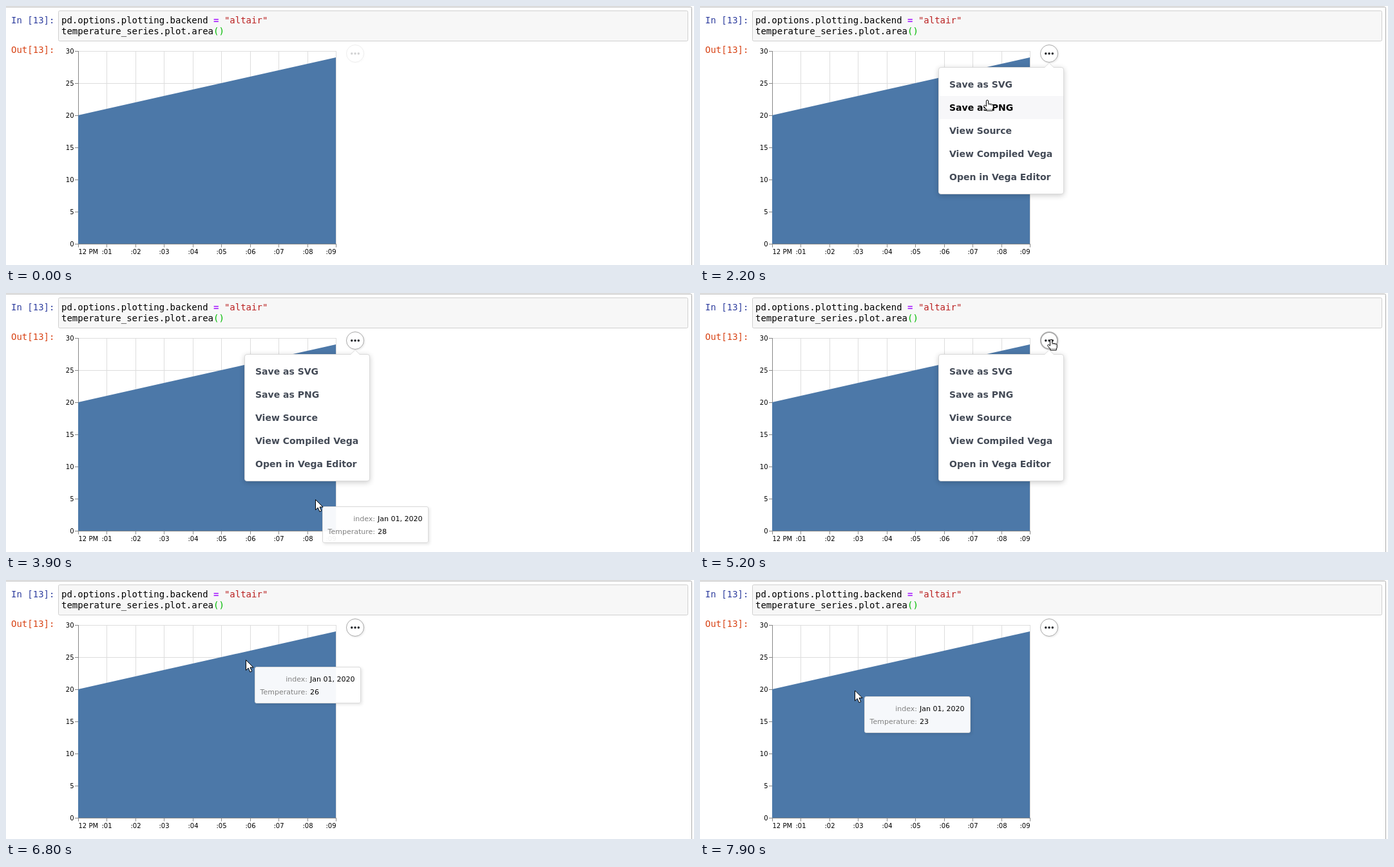
Animation, 1068 px wide and 403 px high, one loop 8 s. Source, as an HTML page:

```html
<!DOCTYPE html>
<html lang="en">
<head>
<meta charset="utf-8">
<title>Area plot in a notebook</title>
<style>
html, body { margin: 0; width: 100%; height: 100%; overflow: hidden; background: #fff; font-family: "DejaVu Sans", sans-serif; }
body > * { position: absolute; box-sizing: border-box; }
#page, #pointer { left: 0; top: 0; }
.code { font: 14px "DejaVu Sans Mono", monospace; white-space: pre; }
#chart text { font-size: 10px; }
#button {
  left: 528px; top: 60px; width: 28px; height: 28px; display: flex; align-items: center; justify-content: center;
  background: #fff; border: 1px solid #aaa; border-radius: 50%; box-shadow: 1px 1px 3px rgba(0, 0, 0, .1);
}
#button svg { flex: none; }
#menu {
  left: 370px; top: 95px; width: 195px; height: 198px; padding: 8px 0; background: #fff;
  border: 1px solid #d9d9d9; border-radius: 4px; box-shadow: 0 2px 8px rgba(0, 0, 0, .2);
}
#menu div { padding: 8px 16px; font-size: 14px; font-weight: 600; line-height: 20px; white-space: nowrap; color: #434a56; }
#menu div.hover { background: #f7f7f9; color: #000; }
#menu::before, #menu::after { content: ""; position: absolute; border: 8px solid transparent; border-bottom-color: #d9d9d9; right: 14px; top: -16px; }
#menu::after { border-width: 7px; border-bottom-color: #fff; right: 15px; top: -14px; }
#tip {
  left: 0; top: 0; width: 165px; height: 57px; background: rgba(255, 255, 255, .95);
  border: 1px solid #d9d9d9; border-radius: 3px; box-shadow: 2px 2px 4px rgba(0, 0, 0, .1);
}
#tip svg { position: absolute; left: -1px; top: -1px; font-size: 11px; }
#pointer g { fill: #fff; stroke: #000; stroke-linejoin: round; }
</style>
</head>
<body>
<svg id="page" width="1068" height="403">
  <path d="M0 1.5H1062.5q2 0 2 2V403" fill="none" stroke="#ababab"/>
  <rect x="81.5" y="7.5" width="977" height="47" rx="2" fill="#f7f7f7" stroke="#cfcfcf"/>
  <g class="code">
    <text x="8" y="27" fill="#303f9f">In [13]:</text>
    <text x="8" y="73" fill="#d84315">Out[13]:</text>
    <text x="86" y="27">pd.options.plotting.backend <tspan fill="#a2f" font-weight="bold">=</tspan> <tspan fill="#ba2121">"altair"</tspan></text>
    <text x="86" y="44">temperature_series.plot.area<tspan fill="#0b0">()</tspan></text>
  </g>
  <g id="chart"></g>
</svg>
<div id="button"><svg width="14" height="14" viewBox="0 0 16 16" fill="#1b1e23"><circle cx="2" cy="8" r="2"/><circle cx="8" cy="8" r="2"/><circle cx="14" cy="8" r="2"/></svg></div>
<div id="menu"><div>Save as SVG</div><div>Save as PNG</div><div>View Source</div><div>View Compiled Vega</div><div>Open in Vega Editor</div></div>
<div id="tip"><svg width="165" height="57">
  <g fill="#808080" text-anchor="end"><text x="82" y="23">index:</text><text x="82" y="43">Temperature:</text></g>
  <text x="86" y="23">Jan 01, 2020</text><text id="value" x="86" y="43"></text>
</svg></div>
<svg id="pointer" width="1068" height="403">
  <g id="arrow"><path d="M-.5-.5V15.5L3.2 12 5.9 18.2 8.7 17 6 11H11z"/></g>
  <g id="hand">
    <path d="M-1.6 10V2a1.6 1.6 0 0 1 3.2 0V6L7.4 7q1.8.4 1.8 2v3q0 2-1 3.4V17H-1.2V15.4L-5 10.6q-1-1.6.2-2.1 1.2-.4 3.2 1.5z"/>
    <path d="M1.8 7v2M4.4 7.5v2M6.9 8v2M-1 14.9H8" stroke-width=".8" stroke-dasharray="1 1"/>
  </g>
  <g id="beam"><path d="M-3-8Q0-8 0-6V6Q0 8-3 8M3-8Q0-8 0-6M0 6Q0 8 3 8" style="fill:none"/></g>
</svg>
<script>
const $ = id => document.getElementById(id);
const LOOP = 8000, STEP = 100, LAG = 30;
const LEFT = 112, TOP = 70, WIDTH = 400, BOTTOM = 370;
const seriesX = i => LEFT + i * WIDTH / 9;
const tempY = v => BOTTOM - v * 10;

function drawChart() {
  let grid = '', axes = '', labels = '';
  for (let v = 0; v <= 30; v += 5) {
    const y = tempY(v) + .5;
    grid += `M${LEFT} ${y}h${WIDTH}`;
    axes += `M${LEFT - 5} ${y}h5`;
    labels += `<text x="105.5" y="${y + 3.5}" text-anchor="end">${v}</text>`;
  }
  for (let i = 0; i < 10; i++) {
    const x = Math.round(seriesX(i)) + .5;
    grid += `M${x} ${TOP}V${BOTTOM}`;
    axes += `M${x} ${BOTTOM}v5.5`;
    const anchor = i === 0 ? 'start' : i === 9 ? 'end' : 'middle';
    labels += `<text x="${x}" y="386" text-anchor="${anchor}">${i ? ':0' + i : '12 PM'}</text>`;
  }
  axes += `M${LEFT + .5} ${TOP}V${BOTTOM + .5}H${LEFT + WIDTH + .5}`;
  $('chart').innerHTML = `<path d="${grid}" stroke="#ddd"/><path d="${axes}" fill="none" stroke="#888"/>
    <path d="M${LEFT} ${BOTTOM}V${tempY(20)}L${LEFT + WIDTH} ${tempY(29)}V${BOTTOM}z" fill="#4c78a8"/>${labels}`;
}

// Pointer path: time, x, y
const path = [
  [700, 424, -4], [1100, 541, 83], [1200, 537.5, 78], [1500, 537.5, 78], [1600, 536, 83],
  [2200, 446, 146], [3100, 462, 268], [3800, 481, 321], [3900, 481, 322], [4000, 481, 322],
  [4300, 494, 296], [4900, 545, 77], [5000, 545, 72], [5500, 545, 72], [5800, 495, 90],
  [6400, 415, 120], [6800, 373, 125], [7300, 314, 138], [7900, 241, 172.5]
];

function pointerAt(t) {
  const next = path.findIndex(p => p[0] >= t);
  if (next < 1) return path[next ? path.length - 1 : 0].slice(1);
  const a = path[next - 1], b = path[next], k = (t - a[0]) / (b[0] - a[0]);
  return [a[1] + (b[1] - a[1]) * k, a[2] + (b[2] - a[2]) * k];
}

const onMenu = (x, y) => x > 370 && x < 565 && y > 95 && y < 293;
const onArea = (x, y) => x >= LEFT && x <= LEFT + WIDTH && y < BOTTOM && y > tempY(20 + (x - LEFT) * 9 / WIDTH);

function pointerShape(x, y, menuOpen) {
  if (y > 8 && y < 54) return 'beam';
  const onButton = Math.hypot(x - 542, y - 74) < 14;
  return onButton || menuOpen && onMenu(x, y) && y > 104 && y < 284 ? 'hand' : 'arrow';
}

const show = (id, on) => $(id).style.visibility = on ? 'visible' : 'hidden';

function render(t) {
  const menuOpen = t >= 1500 && t < 5300;
  const pressed = t >= 1400 && t < 1500 || t >= 5100 && t < 5300;
  const [x, y] = pointerAt(t);
  const shape = pointerShape(x, y, menuOpen);
  for (const id of ['arrow', 'hand', 'beam']) show(id, t >= 700 && id === shape);
  $(shape).setAttribute('transform', `translate(${x} ${y})`);

  const fade = Math.min(1, Math.max(0, (t - 1000) / 200));
  $('button').style.opacity = .2 + .8 * (1 - (1 - fade) ** 2);
  $('button').style.borderWidth = pressed ? '2px' : '1px';

  // The page reacts slightly behind the pointer
  const [px, py] = pointerAt(t - LAG);
  const overMenu = menuOpen && onMenu(px, py);
  show('menu', menuOpen);
  [...$('menu').children].forEach((item, i) =>
    item.classList.toggle('hover', overMenu && Math.floor((py - 104) / 36) === i));

  show('tip', t >= 700 && !overMenu && onArea(px, py));
  $('tip').style.transform = `translate(${Math.round(px + 10)}px, ${Math.round(py + 10)}px)`;
  $('value').textContent = 20 + Math.round((px - LEFT) * 9 / WIDTH);
}

function tick() {
  render(Math.floor(performance.now() % LOOP / STEP) * STEP);
  requestAnimationFrame(tick);
}

drawChart();
tick();
</script>
</body>
</html>
```
